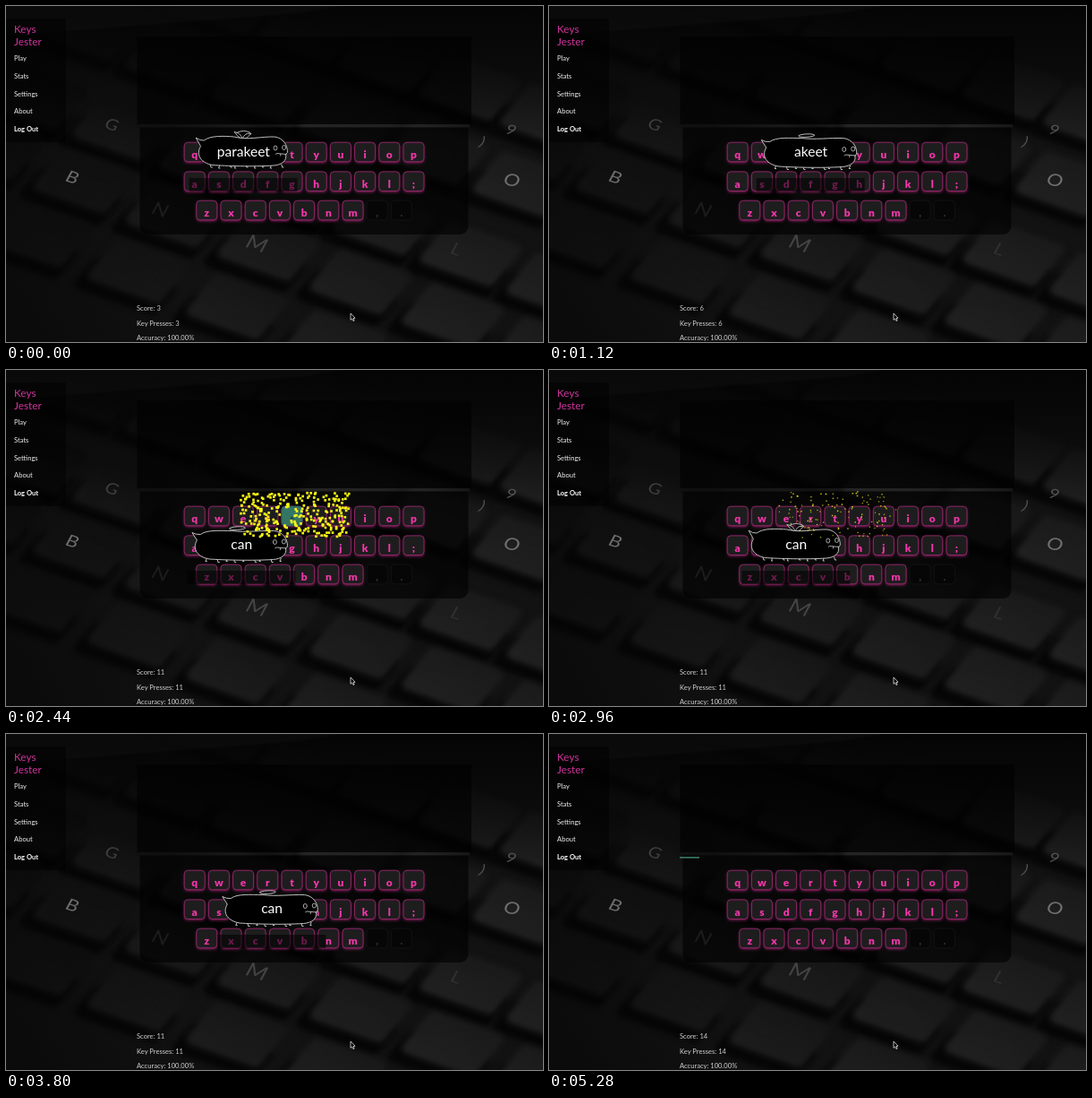
Recreate the animation shown at these times as an HTML page with a canvas. Size 600 by 375 pixels, loop 5320 ms.

```html
<!DOCTYPE html>
<html lang="en">
<head>
<meta charset="utf-8">
<title>Typing game</title>
<style>
  html, body { margin: 0; width: 100%; height: 100%; overflow: hidden; background: #0b0b0b; }
  canvas, svg { position: absolute; left: 0; top: 0; width: 600px; height: 375px; }
  svg { font: 400 7.6px Lato, "Open Sans", sans-serif; fill: #f0f0f0; }
  .title { font-size: 11.8px; fill: #cf349c; }
  .bold { font-weight: 700; fill: #fff; }
  .stats { fill: #d0d0d0; }
</style>
</head>
<body>
<canvas id="stage" width="600" height="375"></canvas>
<svg viewBox="0 0 600 375">
  <g class="title"><text x="9" y="30">Keys</text><text x="9" y="43.5">Jester</text></g>
  <text x="9" y="61">Play</text>
  <text x="9" y="80.7">Stats</text>
  <text x="9" y="100.5">Settings</text>
  <text x="9" y="120.3">About</text>
  <text x="9" y="140" class="bold">Log Out</text>
  <g class="stats">
    <text x="146" y="340.3" id="score"></text>
    <text x="146" y="356.6" id="presses"></text>
    <text x="146" y="373">Accuracy: 100.00%</text>
  </g>
</svg>
<script>
const LOOP = 5320, W = 600, H = 375;
const FONT = 'Lato, "Open Sans", sans-serif';
const PINK = '#f537ac', GREEN = '#347563';
const ctx = document.getElementById('stage').getContext('2d');
const scoreText = document.getElementById('score');
const pressText = document.getElementById('presses');

// [time, letter]
const presses = [[200, 'p'], [760, 'a'], [980, 'r'], [1180, 'a'], [1360, 'k'],
  [1900, 'e'], [2140, 'e'], [2400, 't'], [4080, 'c'], [4260, 'a'], [4440, 'n']];
const words = [
  { text: 'parakeet', start: 0, end: 2400, x: 264.5, y: 163, speed: 0.0243, first: 0 },
  { text: 'can', start: 2400, end: 4440, x: 261.4, y: 195, speed: 0.0249, first: 8 }
];
const wordX = (w, t) => w.x + w.speed * (t - w.start);

const keys = {};
[['qwertyuiop', 210.7, 163], ['asdfghjkl;', 210.7, 195.7], ['zxcvbnm,.', 224.3, 228]]
  .forEach(([row, x, y]) => [...row].forEach((ch, i) => {
    keys[ch] = { ch, x: x + i * 27.2, y, off: ch === ',' || ch === '.' };
  }));

function random(seed) {
  return () => {
    seed = (seed * 1664525 + 1013904223) >>> 0;
    return seed / 4294967296;
  };
}

function layer(paint) {
  const c = document.createElement('canvas');
  c.width = W;
  c.height = H;
  paint(c.getContext('2d'));
  return c;
}

function poly(g, pts) {
  g.beginPath();
  pts.forEach(([x, y]) => g.lineTo(x, y));
  g.closePath();
}

const gray = v => `rgb(${v},${v},${v})`;

// Blurred keyboard backdrop: keycaps on a skewed lattice, dark skirt below each.
function paintCap(g, x, y, shade) {
  const cx = x + 11, cy = y + 5;
  const at = (a, b) => [cx + 43 * a - 21 * b, cy + 15 * a + 25 * b];
  const fill = g.createLinearGradient(cx + 15, cy - 30, cx - 15, cy + 30);
  fill.addColorStop(0, gray(shade - 5));
  fill.addColorStop(1, gray(shade + 2));
  g.lineJoin = 'round';
  g.strokeStyle = g.fillStyle = '#060606';
  g.lineWidth = 12;
  poly(g, [at(-.9, .2), at(.95, .2), at(.95, 1.1), at(-.95, 1.1)]);
  g.fill();
  g.stroke();
  g.strokeStyle = g.fillStyle = fill;
  g.lineWidth = 14;
  poly(g, [at(-.8, -.75), at(.84, -.75), at(.84, .62), at(-.8, .62)]);
  g.fill();
  g.stroke();
}

function paintBackdrop(g) {
  g.fillStyle = '#121212';
  g.fillRect(0, 0, W, H);
  g.filter = 'blur(3px)';
  const rows = [[236, -8, 90, 32], [177, 55, 97, 35], [118, 133, 97, 35], [74, 192, 103, 37.5], [25, 252, 110, 40]];
  rows.forEach(([x, y, dx, dy]) => {
    for (let c = -3; c < 6; c++) {
      const kx = x + c * dx, ky = y + c * dy;
      paintCap(g, kx, ky, Math.max(18, Math.min(31, 18 + kx / 45 + (ky - 130) / 60)));
    }
  });
  g.filter = 'none';
  const dark = g.createLinearGradient(0, 0, 0, 150);
  dark.addColorStop(0, 'rgba(4,4,4,.96)');
  dark.addColorStop(.25, 'rgba(4,4,4,.75)');
  dark.addColorStop(1, 'rgba(4,4,4,0)');
  g.fillStyle = dark;
  g.fillRect(0, 0, W, 150);
  const floor = g.createLinearGradient(0, 300, 160, 220);
  floor.addColorStop(0, 'rgba(4,4,4,.5)');
  floor.addColorStop(1, 'rgba(4,4,4,0)');
  g.fillStyle = floor;
  g.fillRect(0, 140, W, 235);
  g.filter = 'blur(1px)';
  g.fillStyle = 'rgba(255,255,255,.025)';
  poly(g, [[-5, -5], [400, -5], [330, 8], [-5, 34]]);
  g.fill();

  g.textAlign = 'center';
  g.textBaseline = 'middle';
  [['G', 118, 133, 62, 20], ['B', 74, 192, 110, 21], ['N', 172, 228, 78, 23], ['M', 280, 266, 68, 25],
    ['L', 503, 272, 48, 22], ['O', 565, 195, 112, 22], ['9', 564, 139, 85, 18], [')', 532, 152, 80, 18]]
    .forEach(([ch, x, y, v, size]) => {
      g.save();
      g.transform(.95, .32, -.42, .78, x, y);
      g.filter = 'blur(.7px)';
      g.font = `400 ${size}px ${FONT}`;
      g.fillStyle = gray(v);
      g.fillText(ch, 0, 0);
      g.restore();
    });
  g.filter = 'none';
}

function keyShape(g, k) {
  g.beginPath();
  g.roundRect(k.x - 11.5, k.y - 10.8, 23, 21.6, 4);
}

function keyLetter(g, k, color) {
  g.font = `900 12px ${FONT}`;
  g.textAlign = 'center';
  g.textBaseline = 'alphabetic';
  g.fillStyle = color;
  g.fillText(k.ch, k.x, k.y + 7);
}

function paintKey(g, k) {
  g.save();
  g.shadowColor = k.off ? 'transparent' : 'rgba(225,45,155,.55)';
  g.shadowBlur = 3;
  g.shadowOffsetY = 1.5;
  keyShape(g, k);
  g.fillStyle = k.off ? '#060606' : '#1e1d1e';
  g.fill();
  g.restore();
  keyShape(g, k);
  g.lineWidth = .9;
  g.strokeStyle = k.off ? '#141414' : '#98296d';
  g.stroke();
  keyLetter(g, k, k.off ? '#303030' : PINK);
}

const scene = layer(g => {
  paintBackdrop(g);
  g.fillStyle = 'rgba(0,0,0,.5)';
  g.fillRect(0, 14, 67, 138);
  g.fillStyle = 'rgba(0,0,0,.62)';
  g.fillRect(146.5, 34, 373.5, 98);
  const strip = g.createLinearGradient(190, 0, 300, 0);
  strip.addColorStop(0, 'rgba(255,255,255,0)');
  strip.addColorStop(1, 'rgba(255,255,255,.055)');
  g.fillStyle = strip;
  g.fillRect(190, 132, 328, 3.5);
  g.fillStyle = 'rgba(0,0,0,.64)';
  g.beginPath();
  g.roundRect(149.5, 135.5, 367, 119.5, [0, 0, 9, 9]);
  g.fill();
  Object.values(keys).forEach(k => paintKey(g, k));
});

function drawBeast(x, y, up) {
  ctx.save();
  ctx.translate(x, y);
  ctx.fillStyle = 'rgba(0,0,0,.55)';
  ctx.fillRect(-60, 29, 121, 15);
  if (up) {
    ctx.translate(0, -1.5);
    ctx.scale(.96, 1);
  }

  ctx.strokeStyle = '#d4d4d4';
  ctx.fillStyle = '#000';
  ctx.lineWidth = .9;
  ctx.lineJoin = 'round';
  const lift = up ? 1 : 0;

  // wings
  ctx.beginPath();
  if (up) {
    ctx.moveTo(0, -13);
    ctx.bezierCurveTo(-2, -18, -5, -20, -10, -21);
    ctx.bezierCurveTo(-7, -19, -8, -16, 0, -13);
    ctx.bezierCurveTo(1, -18, 5, -20, 10, -19);
    ctx.bezierCurveTo(6, -17, 7, -14, 0, -13);
    ctx.moveTo(-7, -20);
    ctx.quadraticCurveTo(1, -24, 9, -20);
  } else {
    ctx.ellipse(-4, -18.4, 9, 1.7, -.05, 0, 7);
  }
  ctx.fill();
  ctx.stroke();

  // legs
  ctx.beginPath();
  for (let i = 0; i < 9; i++) {
    const lx = -38 + i * 10 + (i % 3) * 1.5, lean = (i + lift) % 2 ? 1 : -1.5;
    ctx.moveTo(lx, 15);
    ctx.lineTo(lx + lean, 18.5 + i % 2);
    ctx.lineTo(lx + lean + 1.8, 18.5 + i % 2);
  }
  ctx.stroke();

  // body with tail
  ctx.beginPath();
  ctx.moveTo(-49, -5);
  ctx.lineTo(-54.5, -13.5 - lift);
  ctx.quadraticCurveTo(-50, -11, -45, -11.5);
  ctx.bezierCurveTo(-38, -17, -22, -15.5 - lift, -10, -15.5);
  ctx.bezierCurveTo(6, -13.5 + 2 * lift, 22, -16, 37, -15.5);
  ctx.bezierCurveTo(47, -14.5, 52.5, -6, 52, 2);
  ctx.lineTo(50, 4);
  ctx.bezierCurveTo(52, 11, 45, 16, 36, 16.5);
  ctx.bezierCurveTo(12, 18, -20, 17, -35, 16);
  ctx.bezierCurveTo(-48, 14, -55, 5, -49, -5);
  ctx.fill();
  ctx.stroke();

  // face
  ctx.lineWidth = .8;
  ctx.beginPath();
  [[38, -3], [48, -3.5]].forEach(([ex, ey]) => {
    ctx.moveTo(ex + 2, ey);
    ctx.ellipse(ex, ey, 2, 2.5, 0, 0, 7);
  });
  ctx.moveTo(38, 4);
  ctx.lineTo(40, 3);
  ctx.lineTo(51, 4);
  ctx.moveTo(44, 3.4);
  ctx.lineTo(44, 6);
  ctx.stroke();
  ctx.restore();
}

function drawWord(w, t, count) {
  const x = wordX(w, t);
  drawBeast(x, w.y, Math.floor(t / 330) % 2 === 0);
  ctx.font = `400 15.6px ${FONT}`;
  ctx.textAlign = 'center';
  ctx.textBaseline = 'alphabetic';
  ctx.fillStyle = '#fff';
  ctx.fillText(w.text.slice(Math.max(0, count - w.first)), x + .8, w.y + 4.6);
}

function drawBurst(w, t) {
  const age = t - w.end;
  if (age < 0 || age > 800) return;
  const rnd = random(w.first + 17), cx = wordX(w, w.end);
  for (let i = 0; i < 270; i++) {
    const a = rnd(), b = rnd(), vx = rnd() - .5, vy = rnd() - .5, n = rnd();
    const life = 340 + 450 * n * (1.1 - .35 * b);
    if (age >= life) continue;
    const left = 1 - age / life, size = 1.1 + 1.7 * left;
    const px = cx + (a * 2 - 1) * 61 + vx * age * .03;
    const py = w.y - 26 + b * 49 + vy * age * .008;
    ctx.fillStyle = `rgba(255,250,20,${.65 + .35 * left})`;
    ctx.fillRect(px - size / 2, py - size / 2, size, size);
  }
}

function drawPressed(t) {
  presses.forEach(([at, ch]) => {
    const age = t - at;
    if (age < 0 || age >= 240) return;
    const k = keys[ch];
    ctx.save();
    ctx.globalAlpha = Math.min(1, 1.2 - age / 200);
    keyShape(ctx, k);
    ctx.fillStyle = GREEN;
    ctx.strokeStyle = '#2a6a5a';
    ctx.fill();
    ctx.stroke();
    keyLetter(ctx, { ch, x: k.x, y: k.y + 1 }, '#1c4a40');
    ctx.restore();
  });
}

function draw(t) {
  const count = presses.filter(p => p[0] <= t).length;
  ctx.drawImage(scene, 0, 0);
  drawPressed(t);
  if (t > 4440) {
    ctx.fillStyle = GREEN;
    ctx.fillRect(146, 137, (t - 4440) * .0262, 1.7);
  }
  words.forEach(w => {
    if (t >= w.start && t < w.end) drawWord(w, t, count);
  });
  words.forEach(w => drawBurst(w, t));

  // pointer
  poly(ctx, [[385, 343], [385, 350.4], [386.7, 349], [388, 351.6], [389.2, 351], [388, 348.5], [390, 348.3]]);
  ctx.fillStyle = '#000';
  ctx.strokeStyle = '#e4e4e4';
  ctx.lineWidth = .8;
  ctx.fill();
  ctx.stroke();

  scoreText.textContent = 'Score: ' + (3 + count);
  pressText.textContent = 'Key Presses: ' + (3 + count);
}

const begin = performance.now();
function tick() {
  draw((performance.now() - begin) % LOOP);
  requestAnimationFrame(tick);
}
tick();
</script>
</body>
</html>
```
